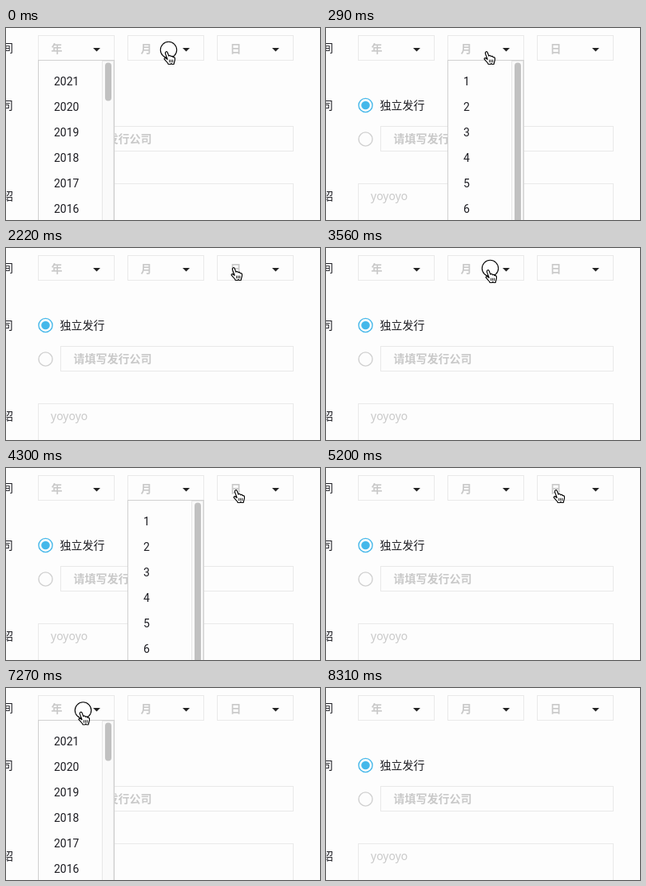
An HTML page for the animation above (8800 ms loop, 393 by 241 pixels).

```html
<!DOCTYPE html>
<html lang="zh-CN">
<head>
<meta charset="utf-8">
<title>Date form</title>
<style>
  html, body { margin: 0; width: 100%; height: 100%; overflow: hidden; background: #fdfdfd; }
  svg { display: block; width: 393px; height: 241px; }
  text { font: 14px "Noto Sans CJK SC", "Noto Sans CJK", "Noto Sans", sans-serif; fill: #1c1c22; }
  .hint { font-weight: 700; fill: #c9c9c9; }
  .latin { font: 500 14px "Noto Sans", "Open Sans", sans-serif; }
  .item { font: 14px Roboto, "Liberation Sans", sans-serif; }
  .field { fill: none; stroke: #e9e9e9; }
  .menu { fill: #fdfdfd; stroke: #d0d0d0; }
  .track { fill: #fafafa; stroke: #e7e7e7; }
  .thumb { fill: #c1c1c1; }
  .hand { fill: #fff; stroke: #000; stroke-width: 1.15; stroke-linejoin: round; stroke-linecap: round; }
</style>
</head>
<body>
<svg id="stage" viewBox="0 0 393 241">
  <text x="-5" y="30">间</text>
  <text x="-5" y="102">司</text>
  <text x="-5" y="216">绍</text>
  <g id="fields"></g>
  <circle cx="49.5" cy="97" r="8.6" fill="none" stroke="#45b8ea" stroke-width="1.4"/>
  <circle cx="49.5" cy="97" r="5.3" fill="#45b8ea"/>
  <text x="67.5" y="102">独立发行</text>
  <circle cx="49.5" cy="139.5" r="8.6" fill="none" stroke="#cfcfcf" stroke-width="1.4"/>
  <rect class="field" x="68.5" y="123.5" width="291" height="31"/>
  <text class="hint" x="84.5" y="144">请填写发行公司</text>
  <rect class="field" x="40.5" y="195.5" width="319" height="80"/>
  <text class="hint latin" x="56" y="216">yoyoyo</text>
  <g id="menus"></g>
  <g id="cursor">
    <circle id="ring" r="10.2" fill="#fff" fill-opacity=".35" stroke="#000" stroke-width="1.1"/>
    <g class="hand" transform="translate(-6.5 1)">
      <path d="M5 10.5 L2.4 3.6 Q2 1.5 3.4 1.2 T5.3 2.5 L6.8 6.6 Q8.6 5 9.5 7.3 Q11.3 6 12 8.2
               Q15 7.4 14.4 11.5 L13 17 H10.8 L10 16 L9 17 H6.2 Q5.6 15.2 3.8 13.6 L1 10.4 Q1.6 7.6 5 10.9 Z"/>
      <path d="M7.6 11.6 v2.8 m2 -2.8 v2.8 m2 -2.8 v2.8" fill="none" stroke-width=".9"/>
    </g>
  </g>
</svg>
<script>
const LOOP = 8800, TICK = 148;
const byId = id => document.getElementById(id);

function add(parent, tag, attrs, text = "") {
  const el = document.createElementNS("http://www.w3.org/2000/svg", tag);
  for (const key in attrs) el.setAttribute(key, attrs[key]);
  el.textContent = text;
  return parent.appendChild(el);
}

const selects = [
  { hint: "年", thumb: 48, first: 2021, step: -1 },
  { hint: "月", thumb: 202, first: 1, step: 1 },
  { hint: "日", thumb: 80, first: 1, step: 1 }
];

const menus = selects.map(({ hint, thumb, first, step }, n) => {
  const x = 40 + 112 * n, fields = byId("fields");
  add(fields, "rect", { class: "field", x: x + .5, y: 9.5, width: 95, height: 31 });
  add(fields, "text", { class: "hint", x: x + 16.5, y: 31 }, hint);
  add(fields, "path", { d: `M${x + 69} 25h9l-4.5 4.6z`, fill: "#222" });

  const menu = add(byId("menus"), "g", {});
  add(menu, "rect", { class: "menu", x: x + .5, y: 40.5, width: 95, height: 285 });
  add(menu, "rect", { class: "track", x: x + 80.5, y: 41.5, width: 14, height: 283 });
  add(menu, "rect", { class: "thumb", x: x + 84, y: 43.5, width: 8, height: thumb, rx: 4 });
  for (let i = 0; i < 6; i++)
    add(menu, "text", { class: "item", x: x + 20, y: 72 + 32 * i }, first + step * i);
  return menu;
});

const smooth = p => p * p * (3 - 2 * p);
const easeIn = p => p ** 1.6;

// pointer moves: start, ticks, target x, target y, easing
const moves = [
  [0, 1, 203.5, 27.5],
  [740, 3, 287.5, 22.5],
  [2970, 4, 205.5, 25.5],
  [3860, 3, 290.5, 25.5],
  [5350, 2, 196.5, 27.5],
  [6090, 2, 103, 29],
  [6540, 1, 96.5, 28],
  [7720, 4, 334, 212, easeIn],
  [8310, 1, 420, 280]
];

// clicks: press, release, menu open afterwards (-1: none)
const clicks = [
  [0, 290, 1],
  [1340, 1480, 2],
  [2080, 2220, -1],
  [3560, 3710, 1],
  [4310, 4450, 2],
  [5050, 5200, -1],
  [5800, 5950, 1],
  [6690, 6830, 0],
  [7270, 7420, -1]
];

function pointerAt(t) {
  const i = moves.findLastIndex(m => m[0] <= t);
  const [begin, ticks, x, y, ease = smooth] = moves[i];
  const [, , fromX, fromY] = moves[Math.max(0, i - 1)];
  const done = Math.min(ticks, Math.floor((t - begin) / TICK) + 1);
  const p = ease(done / ticks);
  return [fromX + (x - fromX) * p, fromY + (y - fromY) * p];
}

const show = (el, on) => el.setAttribute("visibility", on ? "visible" : "hidden");
const start = performance.now();

function draw() {
  const t = Math.max(0, performance.now() - start) % LOOP;
  const [x, y] = pointerAt(t);
  const last = clicks.findLast(c => c[1] <= t);
  const open = last ? last[2] : 0;
  byId("cursor").setAttribute("transform", `translate(${x} ${y})`);
  show(byId("ring"), clicks.some(([down, up]) => t >= down && t < up));
  menus.forEach((menu, i) => show(menu, i === open));
  requestAnimationFrame(draw);
}
draw();
</script>
</body>
</html>
```
